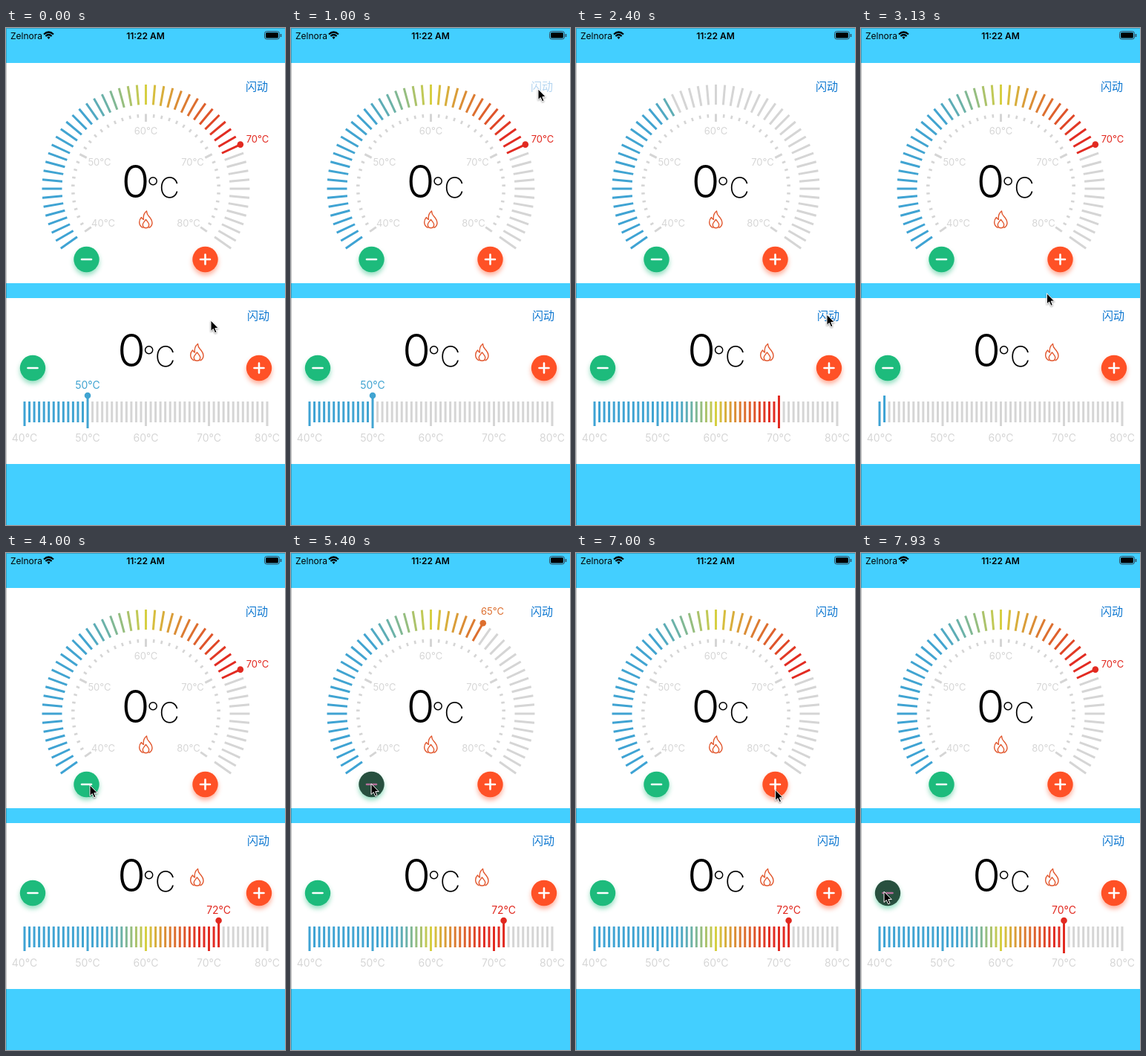
An HTML page that plays this animation: 376x668 px, repeating every 8 s.

```html
<!DOCTYPE html>
<html lang="zh">
<head>
<meta charset="utf-8">
<style>
html, body { margin: 0; width: 100%; height: 100%; overflow: hidden; background: #43cfff; }
svg { display: block; width: 376px; height: 668px; font-family: Inter, Roboto, sans-serif; }
.link { font: 15px "Noto Sans CJK SC", "Noto Sans CJK", sans-serif; fill: #0b76d0; text-anchor: middle; }
.flame { fill: none; stroke: #e2582f; stroke-width: 1.4; stroke-linejoin: round; }
.scale { fill: #d6d6d6; text-anchor: middle; }
.mark text { text-anchor: middle; }
.btn path { stroke: #fff; stroke-width: 2.6; stroke-linecap: round; }
.minus { fill: #1dbb7c; filter: drop-shadow(0 4px 3px #1dbb7c77); }
.plus { fill: #ff5126; filter: drop-shadow(0 4px 3px #ff512677); }
.minus.down circle { fill: #28503f; }
.minus.down path { stroke: #b5709c; }
.plus.down circle { fill: #76301f; }
.plus.down path { stroke: #b9a09a; }
</style>
</head>
<body>
<svg viewBox="0 0 376 668">
  <defs>
    <g id="flame" class="flame">
      <path d="M-4 11C-10 8-10 1-6-3C-5-1-4 0-3 0C-4-5-2-9 1-11.500C1-6 4-5 6-2C10 3 9 9 4 11"/>
      <path d="M-3 10.500C-6 6-3 4 0 0C3 4 6 6 3 10.500C1 11.500-1 11.500-3 10.500Z"/>
    </g>
    <g id="zero">
      <text x="-14" y="0" font-size="61" font-weight="300" text-anchor="middle">0</text>
      <text x="1" y="0" font-size="38" font-weight="200" textLength="">°C</text>
    </g>
  </defs>
  <rect width="376" height="668" fill="#43cfff"/>
  <path d="M0 47H376V343H0ZM0 363H376V586H0Z" fill="#fff"/>
  <path d="M.5 668V.5H376" fill="none" stroke="#000" stroke-opacity=".22"/>

  <text x="6" y="14.500" font-size="12">Zelnora</text>
  <g fill="none" stroke="#000" stroke-width="2.200">
    <path d="M51 8.500Q57.500 2.500 64 8.500M53.400 11Q57.500 7 61.600 11"/>
    <path d="M55.500 12.500Q57.500 10.500 59.500 12.500L57.500 15Z" fill="#000" stroke="none"/>
    <rect x="348.500" y="4.500" width="20" height="10.500" rx="3" stroke="#345" stroke-width="1"/>
    <path d="M370.500 8V12" stroke="#345" stroke-width="1.500"/>
    <rect x="350" y="6" width="17" height="7.500" rx="1.500" fill="#000" stroke="none"/>
  </g>
  <text x="188" y="14.500" font-size="12" font-weight="600" text-anchor="middle">11:22 AM</text>

  <text id="topLink" class="link" x="338" y="84">闪动</text>
  <text id="lowLink" class="link" x="340" y="392">闪动</text>
  <use href="#zero" x="188.500" y="228"/>
  <use href="#zero" x="183" y="455"/>
  <use href="#flame" x="188.500" y="257.500"/>
  <use href="#flame" x="257.500" y="436"/>
  <g id="parts"></g>
  <path id="cursor" d="M0 0V14.500L3.300 11.500L5.600 16.800L8 15.800L5.800 10.600H10.300Z" stroke="#fff" stroke-width="1"
    style="filter:drop-shadow(0 1px 1px #0006)"/>
</svg>
<script>
const LOOP = 8000, TICK_MS = 11.6, GREY = '#d5d5d5';
const CX = 188.5, CY = 216;
const parts = document.getElementById('parts');
const byId = id => document.getElementById(id);

function add(tag, attrs, parent = parts) {
  const el = document.createElementNS('http://www.w3.org/2000/svg', tag);
  set(el, attrs);
  return parent.appendChild(el);
}
function set(el, attrs) {
  for (const k in attrs) el.setAttribute(k, attrs[k]);
}
const toIndex = temp => Math.round((temp - 40) * 1.25);
const majors = [40, 50, 60, 70, 80].map(toIndex);
const polar = (deg, rx, ry = rx) => {
  const a = deg * Math.PI / 180;
  return [CX + rx * Math.sin(a), CY - ry * Math.cos(a)];
};
const ray = (deg, r1, r2) => `M${polar(deg, r1)}L${polar(deg, r2)}`;
const gaugeAngle = i => i * 5 - 125;
const barX = i => 25 + i * 6.54;

// Piecewise linear interpolation over rows of [position, ...values]
function lerp(rows, p) {
  let k = rows.findIndex(r => r[0] > p);
  if (k < 0) return rows[rows.length - 1].slice(1);
  k = Math.max(k, 1);
  const [a, b] = [rows[k - 1], rows[k]], u = (p - a[0]) / (b[0] - a[0]);
  return a.slice(1).map((v, j) => v + (b[j + 1] - v) * u);
}
const ramp = [[0, 62, 163, 212], [17, 66, 164, 208], [20, 108, 178, 168], [25, 214, 207, 66],
  [30, 220, 124, 50], [36, 226, 44, 34], [50, 224, 32, 28]];
const colours = Array.from({ length: 51 }, (_, i) => `rgb(${lerp(ramp, i).map(Math.round)})`);

// Dial
for (let i = 0; i <= 40; i++) {
  add('path', { d: ray(i * 6.25 - 125, i % 10 ? 96 : 90, 100.5), stroke: GREY, 'stroke-width': i % 10 ? 2.6 : 3 });
}
function scaleLabel(temp, x, y, size) {
  add('text', { class: 'scale', x, y: y + size * .36, 'font-size': size }).textContent = temp + '°C';
}
[[40, 131, 262], [50, 126, 180], [60, 188.5, 138], [70, 251.5, 180], [80, 246, 262]]
  .forEach(([temp, x, y]) => scaleLabel(temp, x, y, 13));
[40, 50, 60, 70, 80].forEach(temp => scaleLabel(temp, barX(toIndex(temp)), 551, 14));

const makeTicks = path => colours.map((_, i) => add('path', { d: path(i), 'stroke-width': 3 }));
function makeMark(size) {
  const g = add('g', { class: 'mark' });
  return { g, dot: add('circle', { r: 4.3 }, g), text: add('text', { 'font-size': size }, g) };
}
function barTick(i, active) {
  const major = majors.includes(i);
  const bottom = major ? (active ? 538 : 535) : 530;
  return `M${barX(i)} ${active ? 494 : 502}V${bottom}`;
}
const dial = {
  ticks: makeTicks(i => ray(gaugeAngle(i), 113, 140)), mark: makeMark(13),
  dotAt: i => polar(gaugeAngle(i), 140.5), textAt: i => polar(gaugeAngle(i), 166, 159)
};
const bar = {
  ticks: makeTicks(i => barTick(i)), mark: makeMark(14), tick: barTick,
  dotAt: i => [barX(i), 494], textAt: i => [barX(i), 480]
};

function button(x, y, kind) {
  const g = add('g', { transform: `translate(${x} ${y})` });
  const b = add('g', {}, g);
  add('circle', { r: 17.2 }, b);
  add('path', { d: 'M-6.500 0H6.500' + (kind === 'plus' ? 'M0-6.500V6.500' : '') }, b);
  return down => b.setAttribute('class', `btn ${kind}${down ? ' down' : ''}`);
}
const dialMinus = button(108.5, 311, 'minus'), dialPlus = button(268.5, 311, 'plus');
const barMinus = button(36, 457, 'minus'), barPlus = button(341, 457, 'plus');

// Tap times, each the moment of release
const dialDown = [4230, 4530, 4870, 5200, 5330, 5460];
const dialUp = [0, 1, 2, 3, 4, 5].map(k => 6265 + 137 * k);
const barDown = [7670, 7800, 8000];
const count = (taps, t) => taps.filter(s => s <= t).length;
const pressed = (taps, t) => taps.some(s => t >= s - 70 && t < s);
const justTapped = (taps, t) => taps.some(s => t >= s && t < s + 65);

// Sweep up, down to the start, then up to the resting value
function sweep(t, start, end) {
  const p = Math.floor((t - start) / TICK_MS);
  if (p < 0 || p >= 100 + end) return null;
  return p <= 50 ? p : Math.abs(100 - p);
}

function show(meter, temp, moving, hidden) {
  const index = moving ?? toIndex(temp);
  meter.ticks.forEach((el, i) => {
    set(el, { stroke: i <= index ? colours[i] : GREY });
    if (meter.tick) set(el, { d: meter.tick(i, i === index) });
  });
  const { g, dot, text } = meter.mark;
  set(g, { visibility: moving !== null || hidden ? 'hidden' : 'visible', fill: colours[index] });
  const [cx, cy] = meter.dotAt(index), [x, y] = meter.textAt(index);
  set(dot, { cx, cy });
  set(text, { x, y: y + 4.8 });
  text.textContent = temp + '°C';
}

const route = [[0, 276, 393], [130, 276, 393], [870, 333, 82], [1080, 333, 82], [1580, 335, 373],
  [1870, 338, 385], [2800, 338, 385], [3650, 113, 312], [4900, 113, 312], [5200, 108, 310],
  [5530, 108, 310], [5930, 269, 318], [7000, 269, 318], [7570, 31, 455], [LOOP, 31, 455]];

function draw(t) {
  const dialTaps = [...dialDown, ...dialUp];
  show(dial, 70 - count(dialDown, t) + count(dialUp, t), sweep(t, 1020, 38), justTapped(dialTaps, t));
  show(bar, t < 1960 ? 50 : 72 - count(barDown, t), sweep(t, 1955, 40), justTapped(barDown, t));
  dialMinus(pressed(dialDown, t));
  dialPlus(pressed(dialUp, t));
  barMinus(pressed(barDown, t));
  barPlus(false);
  set(byId('topLink'), { opacity: pressed([1020], t) ? .3 : 1 });
  set(byId('lowLink'), { opacity: pressed([1955], t) ? .3 : 1 });
  set(byId('cursor'), { transform: `translate(${lerp(route, t)})` });
}

const begin = performance.now();
function frame() {
  draw((performance.now() - begin) % LOOP);
  requestAnimationFrame(frame);
}
frame();
</script>
</body>
</html>
```
